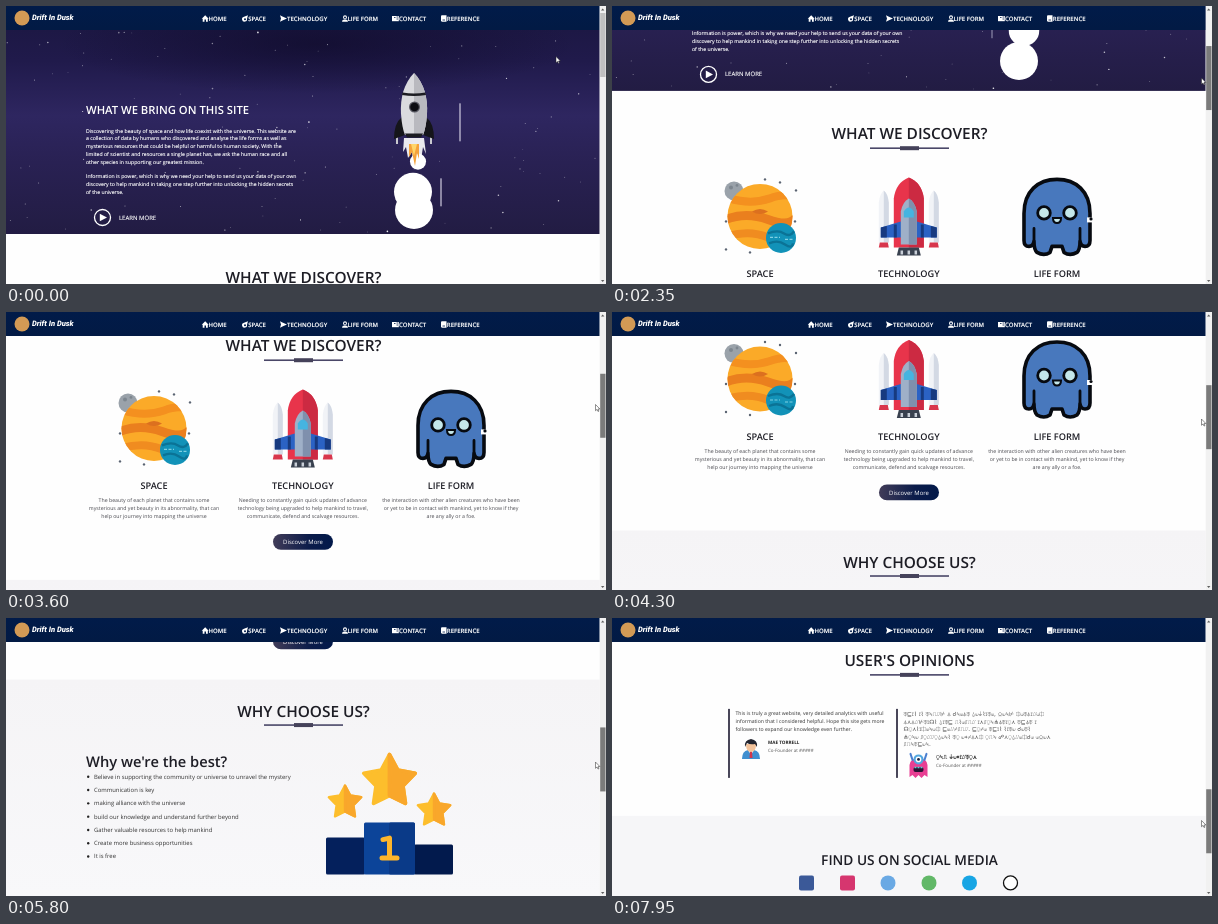
An HTML page that plays this animation: 600 by 278 pixels, repeating every 8 s.

```html
<!DOCTYPE html>
<html lang="en">
<head>
<meta charset="utf-8">
<title>Space site scroll</title>
<style>
  html, body { margin: 0; width: 100%; height: 100%; overflow: hidden; background: #fff; }
  svg { display: block; width: 100vw; height: 100vh; }
  text { font-family: "Open Sans", "Noto Sans", sans-serif; text-rendering: geometricPrecision; }
  .alien { font-family: "DejaVu Sans", sans-serif; }
  .bright { stroke: #fff; stroke-width: .14; }
</style>
</head>
<body>
<svg id="stage" viewBox="0 0 600 278" xmlns="http://www.w3.org/2000/svg"></svg>
<script>
const LOOP = 8000;
const WIDTH = 593.7;
const stage = document.getElementById('stage');

// Markup helpers
const text = (x, y, size, str, fill = '#222', extra = '') =>
  `<text x="${x}" y="${y}" font-size="${size}" fill="${fill}" ${extra}>${str}</text>`;
const lines = (x, y, step, size, rows, fill, extra) =>
  rows.map((row, i) => text(x, y + i * step, size, row, fill, extra)).join('');
const circle = (x, y, r, fill, extra = '') =>
  `<circle cx="${x}" cy="${y}" r="${r}" fill="${fill}" ${extra}/>`;
const rect = (x, y, w, h, fill, rx = 0, extra = '') =>
  `<rect x="${x}" y="${y}" width="${w}" height="${h}" rx="${rx}" fill="${fill}" ${extra}/>`;
const path = (d, fill, extra = '') => `<path d="${d}" fill="${fill}" ${extra}/>`;
const group = (body, extra = '') => `<g ${extra}>${body}</g>`;
const at = (x, y, body) => group(body, `transform="translate(${x} ${y})"`);
const MID = 'text-anchor="middle"';
const SEMI = 'font-weight="600"';
const BRIGHT = 'class="bright"';

const heading = (y, str, size = 15.4) => text(297.5, y, size, str, '#1d1d25', `${MID} ${SEMI}`);
const rule = y => rect(258, y - .8, 79, 1.6, '#4a4768') + rect(288, y - 2, 19, 4, '#45425a');

function random(seed) {
  return () => (seed = (seed * 16807) % 2147483647) / 2147483647;
}

const ALPHABET = [...'⏃⏚☊⎅⟒⎎☌⊑⟟⟊☍⌰⋔⋏⍜⌿☍⍀⌇⏁⎍⎐⍙⌖⊬⋉'];
const alien = str => str.toLowerCase().replace(/[a-z]/g, c => ALPHABET[c.charCodeAt(0) - 97]);

function stars() {
  const rnd = random(4127);
  return Array.from({ length: 115 }, () => {
    const x = rnd() * WIDTH, y = 25 + rnd() * 202, r = .35 + rnd() ** 2 * .55;
    return circle(x.toFixed(1), y.toFixed(1), r.toFixed(2), '#fff', `opacity="${(.4 + rnd() * .55).toFixed(2)}"`);
  }).join('');
}

function star(x, y, r) {
  const point = i => {
    const a = i * Math.PI / 5, k = i % 2 ? r * .52 : r;
    return `${(x + k * Math.sin(a)).toFixed(1)} ${(y - k * Math.cos(a)).toFixed(1)}`;
  };
  const shape = n => 'M' + Array.from({ length: n }, (_, i) => point(i)).join('L') + 'Z';
  const join = c => `stroke="${c}" stroke-width="${r * .14}" stroke-linejoin="round"`;
  return path(shape(10), '#fdbe2c', join('#fdbe2c')) + path(shape(6), '#f9a72b', join('#f9a72b'));
}

function rocket() {
  return path('M391 128V138M425 128V138', 'none', 'stroke="#c9c9cf" stroke-width="2"') +
    path('M396 111Q388 117 388 133L399 129ZM420 111Q428 117 428 133L417 129Z', '#15151a') +
    path('M408 67C398 77 394 92 395 108Q396 122 399 129H417Q420 122 421 108C422 92 418 77 408 67Z', '#dadade') +
    path('M408 67C418 77 422 92 421 108Q420 122 417 129H408Z', '#b9b9bf') +
    path('M396.500 86.500Q408 88.500 419.500 86.500L420 89Q408 91 396 89Z', '#1c1c22') +
    circle(408.5, 101, 5.5, '#55555f') + circle(408.5, 101, 4.3, '#0c0c12') +
    path('M399 127.500H417L415 131.500H401Z', '#1c1c22');
}

function hero() {
  return rect(0, 24, WIDTH, 204, 'url(#sky)') +
    '<ellipse cx="310" cy="38" rx="260" ry="50" fill="url(#shade)"/>' + stars() +
    text(80, 108.3, 11.25, 'WHAT WE BRING ON THIS SITE', '#fff', SEMI) +
    lines(80, 126.5, 7.95, 5.18, [
      'Discovering the beauty of space and how life coexist with the universe. This website are',
      'a collection of data by humans who discovered and analyse the life forms as well as',
      'mysterious resources that could be helpful or harmful to human society. With the',
      'limited of scientist and resources a single planet has, we ask the human race and all',
      'other species in supporting our greatest mission.'], '#fff', BRIGHT) +
    lines(80, 172, 7.95, 5.18, [
      'Information is power, which is why we need your help to send us your data of your own',
      'discovery to help mankind in taking one step further into unlocking the hidden secrets',
      'of the universe.'], '#fff', BRIGHT) +
    circle(96.5, 211.5, 8, 'none', 'stroke="#fff" stroke-width="1.3"') +
    path('M93.800 207.700L101 211.500L93.800 215.300Z', '#fff') +
    text(113, 213.5, 6, 'LEARN MORE', '#fff', BRIGHT) +
    group('', 'id="streaks" clip-path="url(#heroClip)"') +
    group('', 'id="smoke"') +
    group(group('', 'id="flame"') + rocket(), 'id="rocket"');
}

function planetIcon() {
  const band = (d, c, w) => path(d, 'none', `stroke="${c}" stroke-width="${w}"`);
  const dots = [[20, -34], [36, -26], [35, 5], [-34, 5], [-34, 33], [-10, 36], [5, -37]]
    .map(([x, y]) => circle(x, y, 1.2, '#5b6472')).join('');
  return dots + circle(-26, -25.5, 9.5, '#9aa2aa') + circle(-29, -29, 2, '#7d868f') + circle(-23, -31, 1.4, '#7d868f') +
    circle(0, 0, 32.5, '#fbaa28') +
    group(band('M-34 -19Q-10 -11 10 -18T36 -16', '#f4901f', 8) +
      band('M-34 3Q-14 -5 8 3T36 1', '#ea7f1e', 9) +
      band('M-34 20Q-10 13 8 21T36 20', '#f08c20', 8), 'clip-path="url(#planetClip)"') +
    path('M-8 -5Q0 -10 8 -5Q0 0 -8 -5Z', '#dc701f') +
    circle(21, 21.5, 15, '#1292b8') +
    band('M8 17Q18 13 24 17T34 15M9 27Q18 23 25 28T33 27', '#0b7396', 2.4) +
    path('M10 21H20M25 23H33', 'none', 'stroke="#7fd0e2" stroke-width="1.2" stroke-dasharray="3 1.500"');
}

function shuttleIcon() {
  const booster = x => path(`M${x - 5} 26V-14Q${x - 4} -23 ${x} -26Q${x + 4} -23 ${x + 5} -14V26Z`, '#f1f3f7') +
    path(`M${x} -26Q${x + 4} -23 ${x + 5} -14V26H${x}Z`, '#d3d9e4') +
    path(`M${x - 4} 26H${x + 4}L${x + 5} 31H${x - 5}Z`, '#d8364c');
  return booster(-25) + booster(25) +
    path('M-15 31V-18Q-13 -34 0 -39Q13 -34 15 -18V31Z', '#e8344b') +
    path('M0 -39Q13 -34 15 -18V31H0Z', '#cc2a42') +
    path('M-8 5L-28 11V21H28V11L8 5Z', '#2b62c4') +
    path('M-28 11L-22 9.500V21H-28ZM28 11L22 9.500V21H28ZM-15 8H-12V21H-15ZM15 8H12V21H15Z', '#173a80') +
    path('M-10 31H10L12 39H-12Z', '#39414f') +
    path('M-7 38V34M0 38V34M7 38V34', 'none', 'stroke="#c9cfd8" stroke-width="2.500"') +
    path('M-8 28V-5Q-6 -15 0 -18Q6 -15 8 -5V28Z', '#9fb0c8') +
    path('M0 -18Q6 -15 8 -5V28H0Z', '#7f90ad') +
    path('M-5 -5Q0 -13 5 -5V1H-5Z', '#45b4e0');
}

function alienIcon() {
  return path('M-33 -3C-33 -25 -19 -37 0 -37S33 -25 33 -3V24Q33 30 28 30Q24 30 23 25Q23 33 20 36Q13 40 7 36L5 30H-5L-7 36Q-13 40 -20 36Q-23 33 -23 25Q-24 30 -28 30Q-33 30 -33 24Z',
    '#4878bd', 'stroke="#070a10" stroke-width="3.600" stroke-linejoin="round"') +
    path('M-23 12V24M23 12V24', 'none', 'stroke="#070a10" stroke-width="2.800" stroke-linecap="round"') +
    [-13, 13].map(x => circle(x, -3.5, 6.3, '#c4e7ea', 'stroke="#070a10" stroke-width="2.800"')).join('') +
    path('M-4 1.500H4Q4 6.500 0 6.500T-4 1.500Z', '#c4e7ea', 'stroke="#070a10" stroke-width="2"') +
    rect(30, 1, 6, 5, '#fff') + circle(34, 2.5, 1.6, '#070a10');
}

function discover() {
  const cards = [
    [148, 'SPACE', planetIcon(), ['The beauty of each planet that contains some',
      'mysterious and yet beauty in its abnormality, that can', 'help our journey into mapping the universe']],
    [296.8, 'TECHNOLOGY', shuttleIcon(), ['Needing to constantly gain quick updates of advance',
      'technology being upgraded to help mankind to travel,', 'communicate, defend and scalvage resources.']],
    [445, 'LIFE FORM', alienIcon(), ['the interaction with other alien creatures who have been',
      'or yet to be in contact with mankind, yet to know if they', 'are any ally or a foe.']]];
  return heading(276.5, 'WHAT WE DISCOVER?') + rule(285.3) +
    cards.map(([x, name, icon, rows]) => at(x, 353.5, icon) +
      text(x, 414.4, 9.2, name, '#1d1d25', `${MID} ${SEMI}`) +
      lines(x, 427.4, 7.9, 5.22, rows, '#4a4a50', MID)).join('') +
    rect(267, 459, 60, 15.8, 'url(#pill)', 7.9) + text(297, 469, 5.95, 'Discover More', '#fff', MID);
}

function whyUs() {
  const points = ['Believe in supporting the community or universe to unravel the mystery',
    'Communication is key', 'making alliance with the universe',
    'build our knowledge and understand further beyond', 'Gather valuable resources to help mankind',
    'Create more business opportunities', 'It is free'];
  return rect(0, 505, WIDTH, 217, 'url(#mist)') + heading(542.5, 'WHY CHOOSE US?') + rule(550.5) +
    text(80, 592, 14.7, "Why we're the best?", '#1d1d25', SEMI) +
    lines(88, 604.1, 13.3, 5.9, points, '#333') +
    points.map((_, i) => circle(82.2, 602.2 + i * 13.3, 1.2, '#222')).join('') +
    rect(320, 663, 39, 37, '#04205c', 1.5) + rect(408, 670, 39, 30, '#021a4d', 1.5) +
    rect(358, 648, 51, 52, '#0c4499', 1.5) + rect(383, 648, 26, 52, '#0a3a88', 1.5) +
    path('M377 665L383.500 663.500V683.500M376 683.500H391', 'none',
      'stroke="#fdb52b" stroke-width="5" stroke-linecap="round" stroke-linejoin="round"') +
    star(383.5, 607, 27) + star(339, 628, 17) + star(428, 636, 17);
}

function opinions() {
  const role = 'Co-Founder at #####';
  const man = path('M-9 10Q-9 2 -3 1H3Q9 2 9 10Z', '#3f8fd0') + path('M-3 1H3L0 6Z', '#fff') +
    path('M-1 2H1L1.500 9H-1.500Z', '#d3364a') + path('M-5 -5H5Q5 3 0 3T-5 -5Z', '#f3c39b') +
    path('M-6 -2Q-7 -9 0 -10Q7 -9 6 -2L4 -5Q-1 -4 -4 -6Z', '#23252f');
  const monster = path('M-9 11V-1Q-8 -8 0 -8T9 -1V11L6 9L3 12L0 9L-3 12L-6 9Z', '#e83f93') +
    path('M-6 -6L-8 -12M6 -6L8 -12', 'none', 'stroke="#4a7fd0" stroke-width="2" stroke-linecap="round"') +
    circle(0, -6.5, 5, '#52a7df') + circle(0, -6.5, 2.8, '#fff') + circle(0, -6.5, 1.4, '#1c2440') +
    rect(-5, 1, 10, 5, '#2a1232', 2) + path('M-4 1.500H4', 'none', 'stroke="#5fd3d8" stroke-width="1.500" stroke-dasharray="2 1"');
  return heading(759.4, "USER'S OPINIONS") + rule(768) +
    rect(116, 802, 2, 69, '#494759') + rect(284, 802, 2, 69, '#494759') +
    lines(123.5, 808.4, 7.75, 5.15, [
      'This is truly a great website, very detailed analytics with useful',
      'information that I considered helpful. Hope this site gets more',
      'followers to expand our knowledge even further.'], '#333') +
    at(139, 842, man) +
    text(156, 837.4, 4.6, 'MAE TORRELL', '#222', 'font-weight="700"') +
    text(156, 844.8, 4.5, role, '#555') +
    lines(291.5, 809.5, 7.5, 5.8, [
      'This is truly a great website, very detailed',
      'analytics with useful information that I',
      'considered helpful. Hope this site gets',
      'more followers to expand our knowledge even',
      'further.'].map(alien), '#444', 'class="alien"') +
    at(306.5, 859, monster) +
    text(324, 852.6, 5.8, alien('oru bexilton'), '#222', 'class="alien" font-weight="700"') +
    text(324, 860.6, 4.5, role, '#555');
}

function social() {
  return rect(0, 909, WIDTH, 120, '#f6f6f8') + heading(957.8, 'FIND US ON SOCIAL MEDIA', 13.7) +
    rect(187, 968.5, 15, 15, '#3b5998', 2) + rect(228, 968.5, 15, 15, '#d6366f', 2) +
    circle(276, 976, 7.5, '#6aa9e4') + circle(317, 976, 7.5, '#62b868') + circle(357.5, 976, 7.5, '#18a5e4') +
    circle(398.5, 976, 7, '#fff', 'stroke="#111" stroke-width="1.300"');
}

function navbar() {
  const items = [
    [196, 'HOME', 202.6, 'M-.300 3.500L3.200 0L6.700 3.500H5.800V6.500H4V4.300H2.500V6.500H.700V3.500Z'],
    [236, 'SPACE', 242.2, 'M6 0L5 3.500A2.500 2.500 0 1 1 2 1.500Z'],
    [274, 'TECHNOLOGY', 281, 'M0 0L3 1.500L7 3.200L3 5L0 6.500L1 3.200Z'],
    [336, 'LIFE FORM', 341.6, 'M3 0A2 2 0 0 1 3 4A2 2 0 0 1 3 0ZM0 6.500Q0 4 3 4.300Q6 4 6 6.500Z'],
    [386, 'CONTACT', 393, 'M0 .800H6.800V6H0Z'],
    [435, 'REFERENCE', 440.8, 'M1 0H5.500V6.500H1Q0 6 0 5V1Q0 0 1 0Z']];
  return rect(0, 0, WIDTH, 24, 'url(#bar)') + circle(16, 12, 7.5, '#d39a55') +
    text(26, 14.2, 7.6, 'Drift In Dusk', '#fff', 'style="font-family:Roboto,sans-serif" font-weight="900" font-style="italic"') +
    items.map(([x, name, tx, d]) => at(x, 9.2, path(d, '#fff')) +
      text(tx, 14.8, 6, name, '#fff', `${SEMI} ${BRIGHT}`)).join('') +
    path('M388 11.500H389.500M390.500 11H392M390.500 13H392M436.500 14H439', 'none', 'stroke="#041d4c" stroke-width=".800"') +
    circle(239, 13.3, 1, '#041d4c') + circle(339, 11.4, 1, '#041d4c');
}

const gradient = (id, dir, stops) => `<linearGradient id="${id}" x1="0" y1="0" ${dir}>` +
  stops.map(([o, c]) => `<stop offset="${o}" stop-color="${c}"/>`).join('') + '</linearGradient>';
const DOWN = 'x2="0" y2="1"', ACROSS = 'x2="1" y2="0"';

stage.innerHTML = '<defs>' +
  gradient('sky', DOWN, [[0, '#1d1845'], [.15, '#201a4b'], [.42, '#2e2660'], [.65, '#292153'], [1, '#221c43']]) +
  gradient('bar', DOWN, [[0, '#011b49'], [1, '#021a44']]) +
  gradient('pill', ACROSS, [[0, '#413c58'], [.6, '#0b1c4a'], [1, '#02194a']]) +
  gradient('mist', DOWN, [[0, '#f5f4f6'], [1, '#f8f8fa']]) +
  '<radialGradient id="shade"><stop stop-color="#0d0926" stop-opacity=".6"/>' +
  '<stop offset="1" stop-color="#0d0926" stop-opacity="0"/></radialGradient>' +
  `<clipPath id="planetClip">${circle(0, 0, 32.5, '#000')}</clipPath>` +
  `<clipPath id="heroClip">${rect(0, 24, WIDTH, 204, '#000')}</clipPath></defs>` +
  rect(0, 0, 600, 278, '#fefefe') +
  group(hero() + discover() + whyUs() + opinions() + social(), 'id="page"') +
  navbar() +
  rect(WIDTH, 0, 7, 278, '#f1f1f1') +
  path('M595 4.500L596.700 2.500L598.400 4.500ZM595 274L596.700 276L598.400 274Z', '#606060') +
  rect(594.2, 0, 5.3, 64, '#c1c1c1', 0, 'id="thumb"') +
  path('M0 0V6.200L1.500 4.900L2.500 7L3.400 6.600L2.500 4.500H4.400Z', '#fff', 'id="cursor" stroke="#222" stroke-width=".500"');

const $ = id => document.getElementById(id);
const [page, thumb, cursor, smoke, streaks, flame, ship] =
  ['page', 'thumb', 'cursor', 'smoke', 'streaks', 'flame', 'rocket'].map($);

// Monotone cubic through [time, value] keys
function curve(keys) {
  const slope = keys.slice(1).map(([t, v], i) => (v - keys[i][1]) / (t - keys[i][0]));
  const tangent = keys.map((_, i) => {
    const a = slope[i - 1] ?? slope[i], b = slope[i] ?? a;
    return a * b > 0 ? 2 * a * b / (a + b) : 0;
  });
  return t => {
    let i = 0;
    while (i < keys.length - 2 && t > keys[i + 1][0]) i++;
    const [t0, v0] = keys[i], [t1, v1] = keys[i + 1], h = t1 - t0;
    const u = Math.min(1, Math.max(0, (t - t0) / h)), w = 1 - u;
    return v0 * (1 + 2 * u) * w * w + h * tangent[i] * u * w * w +
      v1 * u * u * (3 - 2 * u) - h * tangent[i + 1] * u * u * w;
  };
}

const scrollAt = curve([[0, 0], [1350, 0], [1450, 5], [2350, 143], [3600, 237],
  [4900, 335], [6650, 557], [7950, 711], [8000, 717]]);
const cursorX = curve([[0, 550], [250, 551], [950, 589.5], [8000, 589.5]]);
const cursorY = curve([[0, 50.5], [950, 45.5], [1400, 45.5], [2350, 72], [3600, 92.5],
  [4900, 121], [6650, 167], [7950, 202.5], [8000, 204]]);

const frac = x => x - Math.floor(x);
const STREAKS = [[454, 97, 38, 0], [435, 172, 28, 0], [362, 106, 36, .45], [380, 189, 18, .45]];
const PUFFS = [[.1, 4], [.65, -1], [.98, 0]];

function drawRocket(t) {
  const bob = 2 - 2 * Math.cos(t * Math.PI / 290);
  ship.setAttribute('transform', `translate(0 ${bob.toFixed(2)})`);
  const k = 2 * Math.sin(t / 45);
  flame.innerHTML =
    path(`M398 132L397 ${146 + k}L400 141L402 ${152 - k}L406 146L408 ${164 + k}L412 146L415 ${154 - k}L417 141L420 ${148 + k}L418 132Z`, '#fff', 'opacity=".9"') +
    path(`M403 138L403 ${151 - k}L406 ${146 + k}L409 ${160 + k}L411 147L413 ${153 + k}L413 138Z`, '#f5a23a') +
    path(`M405 138L408 ${150 + k}L411 138Z`, '#ffd56a');
  smoke.innerHTML = PUFFS.map(([phase, dx]) => {
    const p = frac(phase + t / 450);
    return circle(408 + dx, 150 + 55 * p, 19 * Math.min(1, .25 + 1.7 * p), '#fff');
  }).join('');
  streaks.innerHTML = STREAKS.map(([x, y, len, phase]) => {
    const p = frac(t / 1000 - phase + .5) - .5;
    const shade = Math.max(0, 1 - Math.abs(p) / .25) * .75;
    return rect(x - .7, y + p * 320, 1.4, len, '#e9e6f5', 0, `opacity="${shade.toFixed(2)}"`);
  }).join('');
}

function draw(t) {
  const scroll = scrollAt(t);
  page.setAttribute('transform', `translate(0 ${-scroll.toFixed(2)})`);
  thumb.setAttribute('y', (7 + scroll * .231).toFixed(2));
  thumb.setAttribute('fill', t < 900 ? '#c1c1c1' : '#7b7b7b');
  cursor.setAttribute('transform', `translate(${cursorX(t).toFixed(2)} ${cursorY(t).toFixed(2)})`);
  if (scroll < 230) drawRocket(t);
}

const start = performance.now();
function tick() {
  draw((performance.now() - start) % LOOP);
  requestAnimationFrame(tick);
}
tick();
</script>
</body>
</html>
```
